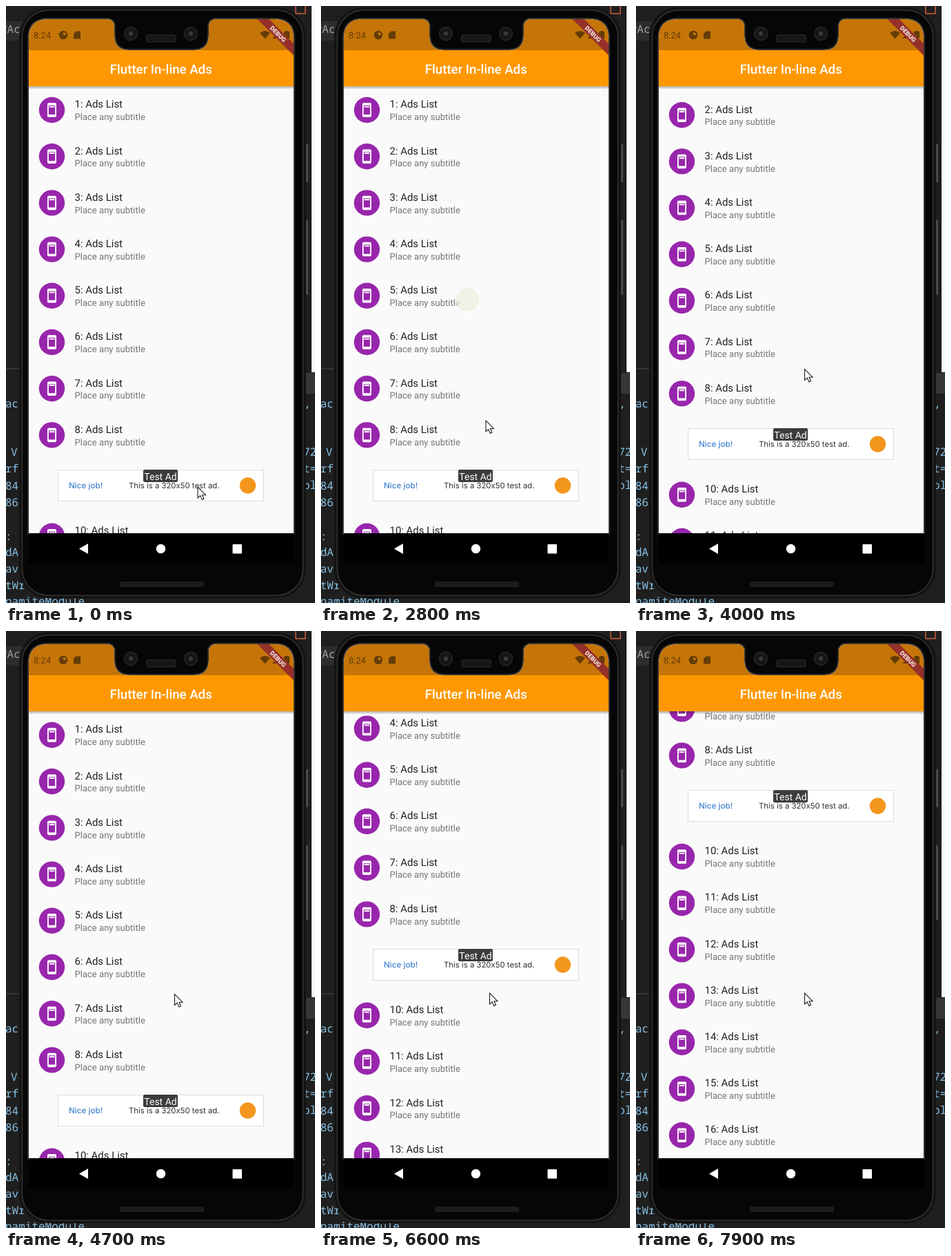
These frames come from a looping animation (448x864 px, 8000 ms). An HTML page:

```html
<!DOCTYPE html>
<html lang="en">
<head>
<meta charset="utf-8">
<title>In-line list ads</title>
<style>
  html, body { margin: 0; width: 100%; height: 100%; overflow: hidden; background: #1f1f1f; }
  svg { display: block; width: 448px; height: 864px; font-family: Roboto, sans-serif; text-rendering: geometricPrecision; }
  .code { font: 16px "Noto Sans Mono", monospace; fill: #88c0e4; white-space: pre; }
  .title { font-size: 14.93px; fill: #212121; }
  .subtitle { font-size: 13.07px; fill: #757575; }
  .ad { font-family: Inter, sans-serif; }
</style>
</head>
<body>
<svg viewBox="0 0 448 864">
  <defs>
    <path id="glass" d="M33 763V47Q33 19 61 19H146Q156 19 157 29V42Q157 64 179 64H272Q294 64 294 42V29Q295 19 305 19H389Q417 19 417 47V763Z"/>
    <clipPath id="screen"><use href="#glass"/></clipPath>
    <clipPath id="viewport"><rect x="33" y="116" width="384" height="647"/></clipPath>
    <linearGradient id="shade" x2="0" y2="1">
      <stop stop-opacity=".3"/>
      <stop offset="1" stop-opacity="0"/>
    </linearGradient>
    <g id="badge">
      <circle r="18.7" fill="#9826ac"/>
      <path transform="scale(.933) translate(-12 -12)" fill="#fff" fill-rule="evenodd"
        d="M17 1H7c-1.1 0-2 .9-2 2v18c0 1.1.9 2 2 2h10c1.1 0 2-.9 2-2V3c0-1.1-.9-2-2-2zm0 18H7V5h10zM8 6h8v2H8z"/>
    </g>
  </defs>

  <!-- Editor behind the phone -->
  <rect width="448" height="864" fill="#1f1f1f"/>
  <rect y="22" width="30" height="28" fill="#2d2d2d"/>
  <path d="M0 525H30" stroke="#4c4c40"/>
  <rect x="443" width="5" height="530" fill="#fafafa"/>
  <rect x="430" y="531" width="18" height="30" fill="#373737"/>
  <rect x="420" y="-4" width="14" height="15" fill="none" stroke="#c25a3c" stroke-width="1.6"/>
  <g id="code" class="code"></g>

  <!-- Phone body -->
  <path d="M434 200h4v55h-4zM434 310h4v108h-4z" fill="#4a4a4a"/>
  <rect x="19" y="2" width="416" height="855" rx="42" fill="#131313"/>
  <rect x="23.500" y="6" width="407" height="847" rx="38" fill="#060606" stroke="#343434" stroke-width="1.5"/>
  <use href="#glass" stroke="#303030" stroke-width="4"/>
  <rect x="33" y="763" width="384" height="43" fill="#000"/>
  <rect x="165" y="833" width="122" height="8" rx="2" fill="#1c1c1c"/>

  <g clip-path="url(#screen)">
    <rect x="33" y="19" width="384" height="744" fill="#fafafa"/>
    <g clip-path="url(#viewport)">
      <g id="list">
        <g class="ad">
          <rect x="75.5" y="671.5" width="298" height="45" fill="#fff" stroke="#dcdcd4"/>
          <text x="91" y="698" font-size="11.7" font-weight="500" fill="#4080d0">Nice job!</text>
          <text x="178" y="698" font-size="11.35" fill="#303030">This is a 320x50 test ad.</text>
          <circle cx="350.5" cy="694" r="11.7" fill="#f3961d"/>
          <rect x="199" y="671" width="50" height="18" rx="2" fill="#3c3c3c"/>
          <text x="224" y="685.5" font-family="Roboto, sans-serif" font-size="14" text-anchor="middle" fill="#fff">Test Ad</text>
        </g>
      </g>
      <circle id="spot" cx="212" cy="425" r="17" fill="#efefe2"/>
    </g>
    <rect x="33" y="19" width="384" height="45" fill="#c57507"/>
    <rect x="33" y="64" width="384" height="52.300" fill="#ff9800"/>
    <rect x="33" y="116.300" width="384" height="4.500" fill="url(#shade)"/>
    <text x="224.800" y="97.500" font-size="18.67" font-weight="500" text-anchor="middle" fill="#fff">Flutter In-line Ads</text>

    <!-- Status bar -->
    <g fill="#653d05">
      <text x="40" y="47" font-size="13">8:24</text>
      <circle cx="83" cy="42" r="6.3"/>
      <path d="M83 38v4h4a4 4 0 0 0-4-4" fill="#c57507"/>
      <path d="M101.500 36.500h6.500v11h-10v-7.500z"/>
      <path d="M368 39q7.500-6 15 0l-7.500 8.500zM397 36v11h-11zM403 37h2v-1h4v1h2v10h-8z"/>
    </g>
    <g transform="translate(394.5 40.500) rotate(45)">
      <rect x="-45" y="-6" width="90" height="12" fill="#96302a"/>
      <text y="3.200" font-size="9" font-weight="900" text-anchor="middle" fill="#f0e4dc">DEBUG</text>
    </g>
  </g>

  <!-- Notch hardware -->
  <g fill="#161616" stroke="#262626" stroke-width="1.500">
    <circle cx="181" cy="40" r="9.500"/><circle cx="268" cy="40" r="9.500"/>
    <rect x="204" y="42" width="42" height="10" rx="3"/>
  </g>
  <g fill="#3a3a3a"><circle cx="181" cy="40" r="3"/><circle cx="268" cy="40" r="3"/></g>

  <!-- Navigation bar -->
  <g fill="#fff">
    <path d="M106 785.500L119 778v15z"/>
    <circle cx="224.500" cy="785.500" r="6.700"/>
    <rect x="328.500" y="779" width="13.500" height="13.500" rx="1"/>
  </g>

  <path id="cursor" d="M0 0V16L3.700 12.600 6.300 18.500 9 17.300 6.500 11.700H11.500Z" fill="#fff" stroke="#1a1a1a" stroke-width="1.100"/>
</svg>
<script>
  const LOOP = 8000, STEP = 100, PITCH = 67.2;
  const $ = id => document.getElementById(id);
  const list = $('list'), cursor = $('cursor'), spot = $('spot');

  function add(parent, tag, attrs, text = '') {
    const node = document.createElementNS('http://www.w3.org/2000/svg', tag);
    for (const name in attrs) node.setAttribute(name, attrs[name]);
    node.textContent = text;
    return parent.appendChild(node);
  }

  const snippets = [
    [-8, 39, 'rAc'], [-1, 581, 'ac'], [7, 651, 'V'], [-1, 675, 'rf'], [-1, 700, '84'],
    [-1, 724, '86'], [-1, 773, ':'], [-1, 796, 'dA'], [-1, 820, 'av'], [-1, 844, 'tWr'],
    [-1, 867, 'namiteModule'], [432, 581, ','], [431, 651, '72'], [431, 675, 't='], [431, 699, 'ol']
  ];
  for (const [x, y, text] of snippets) add($('code'), 'text', { x, y }, text);
  $('code').firstChild.style.fill = '#a0a0a0';

  for (let n = 1; n <= 17; n++) {
    if (n === 9) continue;
    const y = n < 9 ? 150.5 + (n - 1) * PITCH : 767.3 + (n - 10) * PITCH;
    add(list, 'use', { href: '#badge', x: 66.5, y });
    add(list, 'text', { class: 'title', x: 99.5, y: y - 3.2 }, `${n}: Ads List`);
    add(list, 'text', { class: 'subtitle', x: 99.5, y: y + 14.7 }, 'Place any subtitle');
  }

  // Each key is [time, value, ...]; values run linearly between keys.
  const scrollKeys = [
    [0, 0], [3800, 0], [3900, 12], [4000, 60], [4200, 130], [4400, 70], [4600, 6], [4700, 0],
    [5500, 0], [5700, 25], [5900, 8], [6000, 13], [6100, 45], [6500, 176], [6900, 316],
    [7000, 373.7], [7200, 428], [7400, 440.8], [LOOP, 440.8]
  ];
  const cursorKeys = [
    [0, 278, 696], [300, 278, 696], [1100, 238, 676], [1500, 114, 748], [1900, 114, 748],
    [2700, 239, 600], [2800, 239, 600], [3600, 244.5, 525.5], [5100, 244.5, 525.5],
    [5300, 244.5, 524], [LOOP, 244.5, 524]
  ];
  const spotKeys = [[0, 0], [2600, 0], [2700, 1], [2800, .8], [3300, 0], [LOOP, 0]];

  function sample(keys, t) {
    const i = keys.findIndex(key => key[0] > t);
    const a = keys[i - 1], b = keys[i];
    const k = (t - a[0]) / (b[0] - a[0]);
    return a.slice(1).map((value, j) => value + (b[j + 1] - value) * k);
  }

  function draw(now) {
    const t = Math.floor((now % LOOP) / STEP) * STEP;
    list.setAttribute('transform', `translate(0 ${-sample(scrollKeys, t)[0]})`);
    cursor.setAttribute('transform', `translate(${sample(cursorKeys, t)})`);
    spot.setAttribute('opacity', sample(spotKeys, t)[0]);
  }

  let start;
  function tick(now) {
    start ??= now;
    draw(now - start);
    requestAnimationFrame(tick);
  }
  draw(0);
  requestAnimationFrame(tick);
</script>
</body>
</html>
```
